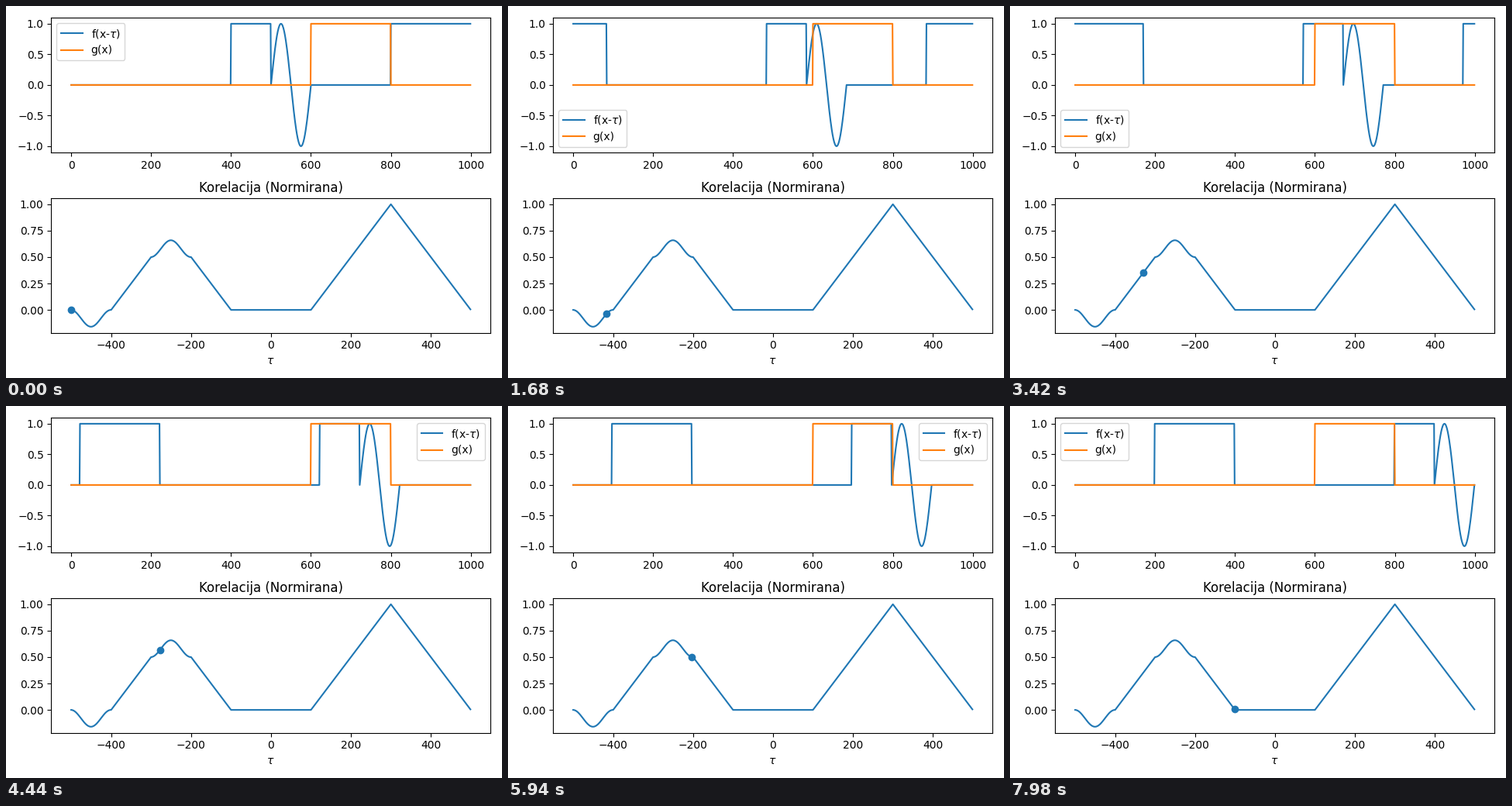
Recreate the animation shown at these times as a matplotlib script. Size 640 by 480 pixels, loop 8 s.

```python
import numpy as np
import matplotlib.pyplot as plt
from matplotlib.animation import FuncAnimation

N = 1000
INTERVAL = 20     # ms per drawn frame
HOLD = 3          # drawn frames per step of tau
FRAMES = 400
STEP = 3          # growth of tau per step

x = np.arange(N)
tau = np.arange(-N // 2, N // 2)

# f: one sine period, a block of ones and a second block at the end
f = np.zeros(N)
f[:100] = np.sin(2 * np.pi * np.arange(100) / 100)
f[300:500] = 1
f[900:] = 1

g = np.zeros(N)
g[600:800] = 1

corr = np.array([np.dot(np.roll(f, t), g) for t in tau])
corr /= corr.max()

fig, (top, bottom) = plt.subplots(2, 1, figsize=(6.4, 4.8), dpi=100)
f_line, = top.plot(x, np.roll(f, tau[0]), label=r"f(x-$\tau$)")
g_line, = top.plot(x, g, label="g(x)")

curve, = bottom.plot(tau, corr)
dot = bottom.scatter(tau[:1], corr[:1], color="C0")
bottom.set_title("Korelacija (Normirana)")
bottom.set_xlabel(r"$\tau$")
fig.tight_layout()
fig.subplots_adjust(hspace=0.34)

# Render the fixed parts once and reuse them as a backdrop
moving = [f_line, g_line, dot]
plt.setp(moving, visible=False)
fig.canvas.draw()
backdrop = np.array(fig.canvas.buffer_rgba())
fig.figimage(backdrop, zorder=-1)
plt.setp(moving, visible=True)
plt.setp([curve, bottom.title], visible=False)
for ax in (top, bottom):
    ax.autoscale(False)
    ax.set_axis_off()
top.legend(loc="best")


def update(frame):
    i = frame // HOLD * STEP
    f_line.set_ydata(np.roll(f, tau[i]))
    dot.set_offsets([(tau[i], corr[i])])
    return moving


anim = FuncAnimation(fig, update, frames=FRAMES, interval=INTERVAL,
                     init_func=lambda: update(0), repeat=True, repeat_delay=0)
plt.show()
```
